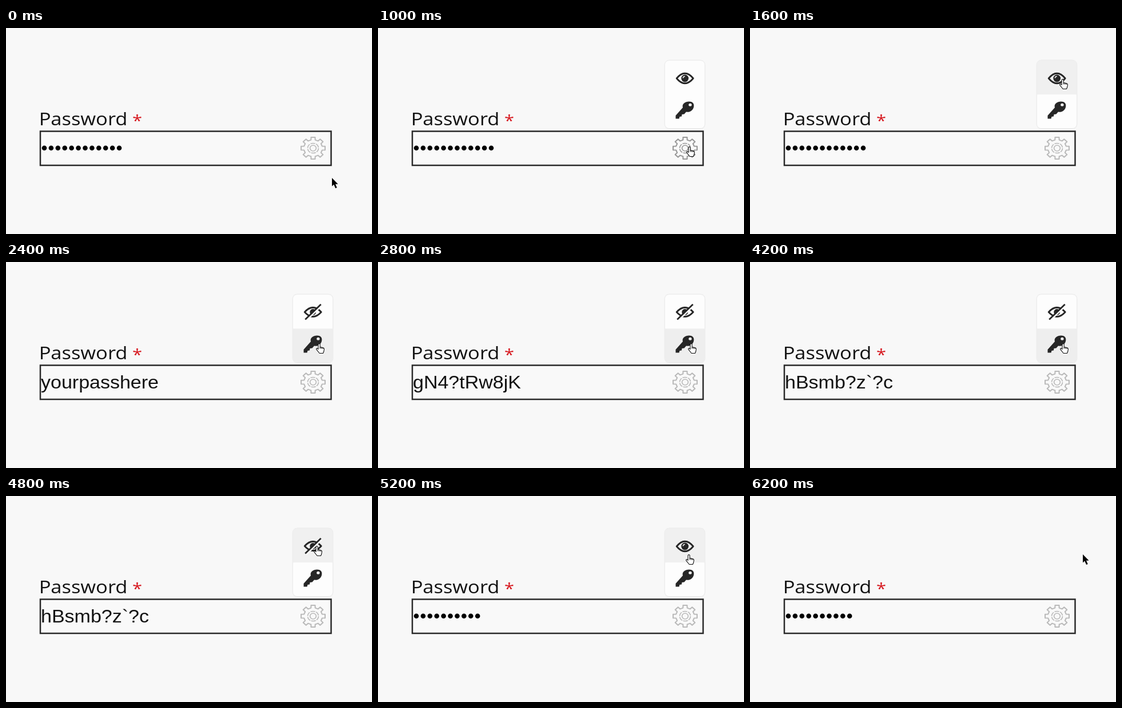
An HTML page that plays this animation: 640 by 360 pixels, repeating every 7.2 s.

```html
<!DOCTYPE html>
<html lang="en">
<head>
<meta charset="utf-8">
<title>Password field</title>
<style>
  html, body { margin: 0; width: 100%; height: 100%; overflow: hidden; background: #f8f8f8; }
  svg { display: block; width: 640px; height: 360px; }
  .label { font: 31.3px "Open Sans", sans-serif; fill: #111; }
  .value { font: 30.9px "Liberation Sans", Arial, sans-serif; fill: #111; white-space: pre; }
  .icon { fill: #262626; }
  .line { fill: none; stroke: #262626; stroke-width: 2.8; stroke-linejoin: round; }
</style>
</head>
<body>
<svg viewBox="0 0 640 360">
  <rect width="640" height="360" fill="#f8f8f8"/>

  <!-- The stage is slightly wide, so type and gear share one aspect. -->
  <g transform="scale(1.1 1)">
    <text class="label" x="52.4" y="170">Password</text>
    <text class="label" x="208.6" y="172" text-anchor="middle" style="font-size:28px;fill:#d71920">*</text>
  </g>

  <rect x="60" y="180.5" width="508.5" height="59.5" fill="#f9f9f9" stroke="#292929" stroke-width="2.5"/>
  <g transform="scale(1.1 1)"><text id="value" class="value" x="55.5" y="221.3"></text></g>
  <path id="dots" stroke="#000" stroke-width="8.6" stroke-linecap="round" stroke-dasharray="0 11.91"/>

  <g id="gear" transform="translate(537 210) scale(1.1 1)" fill="none" stroke-width="1.9" stroke-linejoin="round">
    <path id="teeth"/>
    <circle r="8.6" stroke-width="1.5" stroke-dasharray="7.5 1.5"/>
    <circle r="4.9" stroke-width="1.5"/>
  </g>

  <g id="menu">
    <rect x="501.5" y="56.5" width="70" height="119.5" rx="8" fill="#fff" stroke="#ededed" stroke-width="2"/>
    <path id="topCell" d="M502 116.5V65q0-8 8-8h53q8 0 8 8v51.5z"/>
    <path id="keyCell" d="M502 116.5h69V167q0 8-8 8h-53q-8 0-8-8z"/>
    <g id="eye" transform="translate(536.7 88)">
      <path class="line" d="M-14.5 0Q0-17.5 14.5 0 0 17.5-14.5 0z"/>
      <circle class="icon" r="6.4"/>
      <path d="M-3.4-.4Q-3.2-3.4 0-3.6" fill="none" stroke="#eee" stroke-width="1.5"/>
    </g>
    <g id="slashedEye" transform="translate(536.7 87.5)">
      <path class="line" d="M-14.5 0Q0-16 14.5 0 0 16-14.5 0z"/>
      <circle class="icon" r="5.4"/>
      <path d="M-11.5 14.5 15.5-11.5" stroke="#fff" stroke-width="2.6"/>
      <path class="line" d="M-13.5 13 14-13.5"/>
    </g>
    <path class="icon" fill-rule="evenodd" d="M533 139C531 133 537 128.5 544 128.5 551 128.5 553.5 133 552 138.5 550.5 144.5 544.5 148 539 146.5L535.5 150.5 531.5 151 531 154.5 527.5 155 526.5 158.5H520.5V153zM543.2 134.3a2.7 2.5 0 1 0 5.4 0 2.7 2.5 0 1 0-5.4 0z"/>
  </g>

  <path id="arrow" d="M0 0V14.5L3.3 11.6 6 18 8.7 17 6 10.7H10.5z" fill="#000"/>
  <path id="hand" d="M4 10.5V2.2a1.6 1.6 0 0 1 3.2 0V6.6l5.2 1.1q2.2.6 2 2.8l-.8 4.3-1.2 2.7H6.2L.9 10.9Q.3 9.2 1.8 8.9 3 8.8 4 10.5zM7.2 6.6V9.5M9.7 7.2V9.8M12.1 7.8V10" fill="#fff" stroke="#111" stroke-width="1.1" stroke-linejoin="round"/>
</svg>
<script>
const LOOP = 7200;
const MENU_OPEN = 1000, MENU_CLOSE = 6200;
const el = id => document.getElementById(id);
const show = (id, on) => el(id).style.display = on ? "" : "none";
const between = (t, from, to) => t >= from && t < to;
const latest = (list, t) => list.findLast(([start]) => start <= t);

// [start, x, y, cursor]
const pointer = [
  [0, 570, 262, "arrow"], [200, 565, 246, "arrow"], [400, 545, 221, "hand"],
  [600, 539, 207, "hand"], [1200, 537, 160, "hand"], [1400, 538, 104, "hand"],
  [1600, 541, 89, "hand"], [2200, 542, 126, "hand"], [2400, 542, 142, "hand"],
  [4400, 542, 133, "hand"], [4600, 538, 104, "hand"], [4800, 538, 87, "hand"],
  [5200, 538, 102, "hand"], [5400, 558, 102, "hand"], [5600, 581, 102, "arrow"],
  [5800, 582, 102, "arrow"]
];

// [start, text]; a number is a count of masked characters
const values = [
  [0, 12], [2000, "yourpasshere"], [2800, "gN4?tRw8jK"],
  [3400, "i!cslV9LDf"], [4200, "hBsmb?z`?c"], [5200, 10]
];

function gearPath(teeth) {
  const points = [];
  for (let i = 0; i < teeth; i++) {
    for (const [radius, degrees] of [[14.8, -13], [19.3, -9.5], [19.3, 9.5], [14.8, 13]]) {
      const a = (i * 360 / teeth + degrees) * Math.PI / 180;
      points.push([radius * Math.sin(a), -radius * Math.cos(a)].map(n => n.toFixed(2)));
    }
  }
  return "M" + points.join("L") + "z";
}

function draw(t) {
  const [, x, y, cursor] = latest(pointer, t);
  for (const id of ["arrow", "hand"]) show(id, id === cursor);
  el(cursor).setAttribute("transform", `translate(${x} ${y})`);

  const value = latest(values, t)[1];
  const masked = typeof value === "number";
  el("value").textContent = masked ? "" : value;
  el("dots").setAttribute("d", masked ? `M67 209.7h${(value - 1) * 11.91 + 0.1}` : "");

  const inMenu = cursor === "hand" && y < 176;
  el("topCell").setAttribute("fill", inMenu && y < 116 ? "#f0f0f0" : "#fdfdfd");
  el("keyCell").setAttribute("fill", inMenu && y >= 116 ? "#eeeeee" : "#fdfdfd");
  show("menu", between(t, MENU_OPEN, MENU_CLOSE));
  show("eye", masked);
  show("slashedEye", !masked);
  el("gear").setAttribute("stroke", between(t, 600, 1400) ? "#999" : "#bababa");
}

el("teeth").setAttribute("d", gearPath(8));
const begin = performance.now();
function tick() {
  draw((performance.now() - begin) % LOOP);
  requestAnimationFrame(tick);
}
tick();
</script>
</body>
</html>
```
